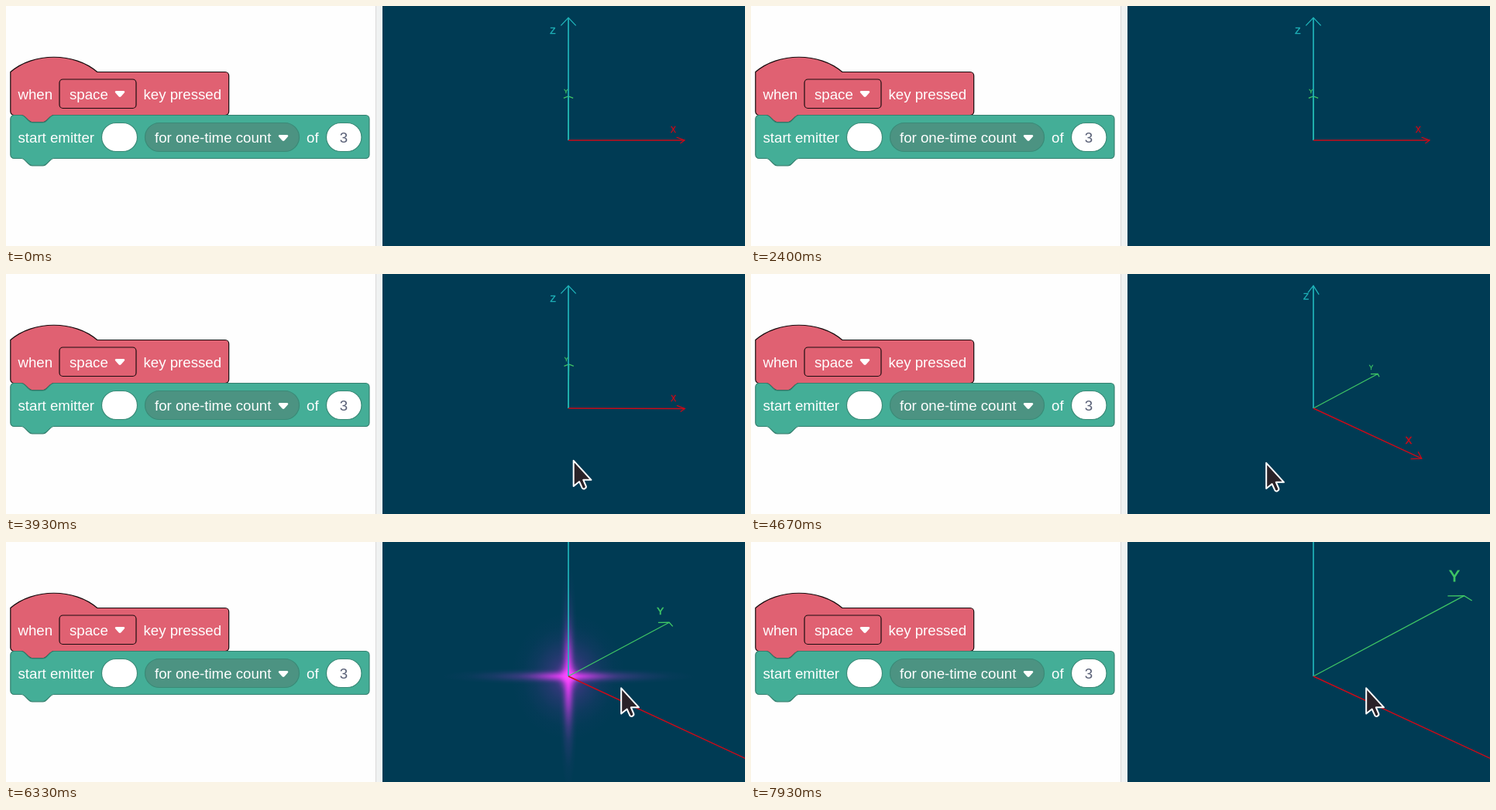
Write an HTML page with a canvas that moves like this. It is 954 by 311 pixels and loops after 8000 ms.

```html
<!DOCTYPE html>
<html lang="en">
<head>
<meta charset="utf-8">
<title>Start emitter</title>
<style>
  html, body { margin: 0; width: 100%; height: 100%; overflow: hidden; background: #fff; }
  canvas, svg { position: absolute; left: 0; top: 0; width: 954px; height: 311px; }
  text { font: 18.67px "Liberation Sans", Arial, sans-serif; fill: #fff; }
  .block { stroke-width: 1.2; }
</style>
</head>
<body>
<canvas id="scene" width="954" height="311"></canvas>
<svg viewBox="0 0 954 311">
  <defs>
    <path id="hat" transform="translate(5.8 85.5) scale(1.1667)" vector-effect="non-scaling-stroke"
      d="M0 0c25-22 71-22 96 0H237.6a4 4 0 0 1 4 4V44a4 4 0 0 1-4 4H48c-2 0-3 1-4 2l-4 4c-1 1-2 2-4 2H24c-2 0-3-1-4-2l-4-4c-1-1-2-2-4-2H4a4 4 0 0 1-4-4Z"/>
    <path id="stack" transform="translate(5.8 141.5) scale(1.1667)" vector-effect="non-scaling-stroke"
      d="M0 4a4 4 0 0 1 4-4H12c2 0 3 1 4 2l4 4c1 1 2 2 4 2H36c2 0 3-1 4-2l4-4c1-1 2-2 4-2H393a4 4 0 0 1 4 4V44a4 4 0 0 1-4 4H48c-2 0-3 1-4 2l-4 4c-1 1-2 2-4 2H24c-2 0-3-1-4-2l-4-4c-1-1-2-2-4-2H4a4 4 0 0 1-4-4Z"/>
    <path id="caret" d="M2 0H11Q14 .5 12 2.800L8 7.200Q6.500 8.600 5 7.200L1 2.800Q-1 .5 2 0Z" fill="#fff"/>
    <filter id="soft" x="-10%" y="-20%" width="120%" height="140%"><feGaussianBlur stdDeviation="1.5"/></filter>
    <clipPath id="editor"><rect width="477" height="311"/></clipPath>
  </defs>

  <g id="glow" clip-path="url(#editor)" visibility="hidden">
    <g stroke="#ffee30" stroke-width="17" stroke-linejoin="round" fill="#ffee30" filter="url(#soft)">
      <use href="#hat"/><use href="#stack"/>
    </g>
  </g>
  <use href="#hat" class="block" fill="#e06172" stroke="#150a0c"/>
  <use href="#stack" class="block" fill="#44ae97" stroke="#35806f"/>

  <rect x="69" y="95" width="99" height="37.500" rx="4.500" fill="#e06172" stroke="#1c0c0f" stroke-width="1.200"/>
  <use href="#caret" x="140.500" y="110"/>
  <g stroke="#3a8a77" stroke-width="1.200">
    <rect x="123.500" y="151.500" width="46" height="37" rx="18.500" fill="#fff"/>
    <rect x="179.500" y="151.500" width="199" height="37" rx="18.500" fill="#4c9382"/>
    <rect x="413.500" y="151.500" width="45.500" height="37" rx="18.500" fill="#fff"/>
  </g>
  <use href="#caret" x="351.500" y="167"/>

  <text x="15.500" y="121">when</text>
  <text x="82" y="121">space</text>
  <text x="177.500" y="121">key pressed</text>
  <text x="15.500" y="177">start emitter</text>
  <text x="192" y="177">for one-time count</text>
  <text x="388" y="177">of</text>
  <text x="436" y="177" text-anchor="middle" style="fill:#575e75">3</text>

  <path id="cursor" d="M1.200 1.800V35L8.600 29 12.300 37.200Q13.500 39 15.500 38.200 18 37 17.300 35L13.800 26.800H24Z"
    fill="#2a2228" stroke="#fff" stroke-width="2" stroke-linejoin="round" visibility="hidden"/>
</svg>
<script>
const LOOP = 8000, STEP = 1000 / 15;
const FOCAL = 411, LEN = 150, OX = 726, OY = 174;
const SIN_TILT = 0.5, COS_TILT = Math.sqrt(0.75);
const TEAL = '#1fb4ba', GREEN = '#3fc765', RED = '#cb0a18';

const ctx = document.getElementById('scene').getContext('2d');
const glow = document.getElementById('glow');
const cursor = document.getElementById('cursor');

// [time, x, y] of the pointer for each stretch in which it is visible
const pointerRuns = [
  [[130, 92, 38], [260, 92, 38], [266, 210, 283], [329, 210, 283]],
  [[3660, 692, 252], [3733, 732, 240], [3933, 731.500, 240], [4200, 708, 244], [4400, 680, 247],
   [4533, 657, 246], [4667, 664, 243], [4800, 667, 242], [5000, 720, 222], [5267, 793, 187.500], [8000, 793, 187.500]]
];
const dolly = [[0, 411], [5333, 411], [5600, 328], [6000, 228], [7130, 228], [7333, 190], [7867, 121], [8000, 121]];
const flares = [[2040, 2400, 0.85], [2900, 3200, 1], [6165, 6565, 1]];
const glows = [[2060, 2395], [2930, 3195]];

function track(keys, t) {
  let i = 1;
  while (i < keys.length - 1 && keys[i][0] < t) i++;
  const a = keys[i - 1], b = keys[i];
  const k = Math.min(1, Math.max(0, (t - a[0]) / (b[0] - a[0])));
  return a.slice(1).map((v, j) => v + (b[j + 1] - v) * k);
}

function pointerAt(t) {
  const run = pointerRuns.find(r => t >= r[0][0] && t <= r[r.length - 1][0]);
  return run ? track(run, t) : null;
}

function yawAt(t) {
  if (t < 3800) return 0;
  const x = t < 4667 ? pointerAt(t)[0] : 664;
  return Math.max(0, (732 - x) / 68) * 43 * Math.PI / 180;
}

function camera(yaw, dist) {
  const c = Math.cos(yaw), s = Math.sin(yaw);
  return (x, y, z) => {
    const away = y * c - x * s;
    const k = FOCAL / (dist + away * COS_TILT - z * SIN_TILT);
    return [OX + (x * c + y * s) * k, OY - (away * SIN_TILT + z * COS_TILT) * k, k];
  };
}

function line(points, color, width) {
  ctx.strokeStyle = color;
  ctx.lineWidth = width;
  ctx.beginPath();
  points.forEach(p => ctx.lineTo(p[0], p[1]));
  ctx.stroke();
}

function axis(project, tip, wingA, wingB, color, width) {
  const end = project(...tip);
  line([[OX, OY], end], color, width);
  line([project(...wingA), end, project(...wingB)], color, 1.300);
}

function label(project, text, at, color) {
  const [x, y, k] = project(...at);
  ctx.font = `${10 * k}px "Liberation Sans", Arial, sans-serif`;
  ctx.fillStyle = ctx.strokeStyle = color;
  ctx.lineWidth = 0.4 * k;
  ctx.fillText(text, x, y + 3.600 * k);
  ctx.strokeText(text, x, y + 3.600 * k);
}

function blob(rx, ry, rgb, alpha) {
  const g = ctx.createRadialGradient(0, 0, 0, 0, 0, 1);
  for (let i = 0; i <= 5; i++) {
    g.addColorStop(i / 5, `rgba(${rgb},${alpha * (1 - i / 5) ** 2})`);
  }
  ctx.save();
  ctx.scale(rx, ry);
  ctx.fillStyle = g;
  ctx.fillRect(-1, -1, 2, 2);
  ctx.restore();
}

function flare(r) {
  ctx.save();
  ctx.translate(OX, OY);
  blob(r * 0.45, r * 0.5, '170,50,215', 0.5);
  blob(r, r * 0.07, '180,60,220', 0.75);
  blob(r * 0.08, r * 0.9, '180,60,220', 0.8);
  blob(r * 0.4, r * 0.06, '240,60,250', 1);
  blob(r * 0.06, r * 0.5, '240,60,250', 1);
  blob(r * 0.12, r * 0.15, '250,70,255', 1);
  blob(r * 0.08, r * 0.08, '255,80,255', 1);
  ctx.restore();
}

function draw(t) {
  const dist = track(dolly, t)[0];
  const project = camera(yawAt(t), dist);

  ctx.fillStyle = '#fefefe';
  ctx.fillRect(0, 0, 478, 311);
  ctx.fillStyle = '#f0f2f2';
  ctx.fillRect(478, 0, 8, 311);
  ctx.fillStyle = '#d9d9d9';
  ctx.fillRect(477, 0, 1, 311);
  ctx.fillStyle = '#003b54';
  ctx.fillRect(486, 0, 468, 311);

  ctx.save();
  ctx.beginPath();
  ctx.rect(486, 0, 468, 311);
  ctx.clip();
  for (const [from, to, size] of flares) {
    if (t <= from || t >= to - 2) continue;
    const p = Math.sin(Math.PI * (t - from) / (to - from));
    flare(94 * size * p * FOCAL / dist);
  }
  const B = LEN - 8, W = 8;
  axis(project, [0, LEN, 0], [W, B, 0], [-W, B, 0], GREEN, 1.200);
  axis(project, [0, 0, LEN], [W, 0, B], [-W, 0, B], TEAL, 1.700);
  axis(project, [LEN, 0, 0], [B, W, 0], [B, -W, 0], RED, 1.400);
  ctx.textAlign = 'center';
  label(project, 'X', [133, 0, 15], RED);
  label(project, 'Y', [-4, 135, 15], GREEN);
  label(project, 'Z', [-17, 6, 136], TEAL);
  ctx.restore();

  const lit = glows.some(([from, to]) => t >= from && t < to);
  glow.setAttribute('visibility', lit ? 'visible' : 'hidden');
  const pos = pointerAt(t);
  cursor.setAttribute('visibility', pos ? 'visible' : 'hidden');
  if (pos) cursor.setAttribute('transform', `translate(${pos[0]} ${pos[1]})`);
}

const start = performance.now();
function frame() {
  const t = (performance.now() - start) % LOOP;
  draw(Math.floor((t + 4) / STEP) * STEP % LOOP);
  requestAnimationFrame(frame);
}
frame();
</script>
</body>
</html>
```
